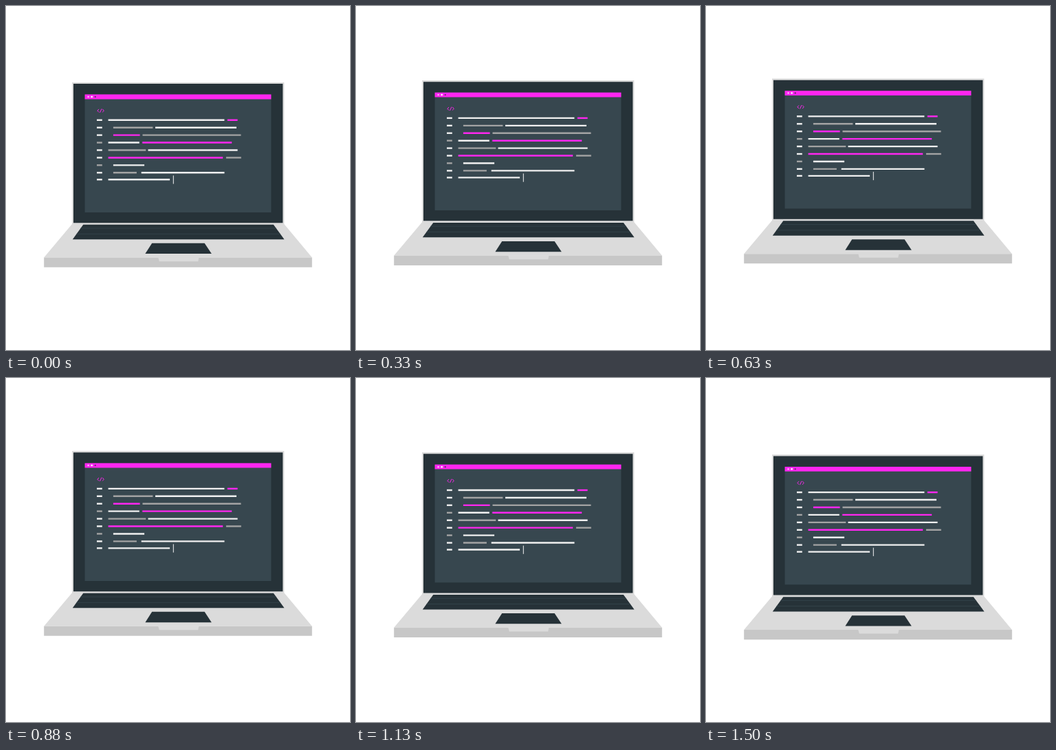
Write an HTML page that moves like this. It is 500x500 px and loops after 1540 ms.

```html
<!DOCTYPE html>
<html lang="en">
<head>
<meta charset="utf-8">
<title>Floating laptop</title>
<style>
  html, body { margin: 0; width: 100%; height: 100%; overflow: hidden; background: #fff; }
  svg { display: block; width: 100vw; height: 100vh; }
</style>
</head>
<body>
<svg viewBox="0 0 500 500">
  <g id="laptop">
    <path fill="#dbdbdb" d="M96 111.3H404.3V317.5L444.8 366H55.2L96 317.5Z"/>
    <path fill="#263238" d="M98 113.5H402.3V315.6H98Z"/>

    <path fill="#37474f" d="M114.6 129H385.4V300.4H114.6Z"/>
    <path fill="#ff26f0" d="M114.6 129H385.4V135.8H114.6Z"/>
    <circle cx="119.6" cy="132.4" r="1.2" fill="#ffc4fa"/>
    <circle cx="124.7" cy="132.4" r="1.3" fill="#fff"/>
    <circle cx="129.7" cy="132.4" r="1.2" fill="#6b2d75"/>
    <path fill="none" stroke="#ff26f0" d="M135 150.3L132.9 152.6L135 154.9M139 149.9L136.5 155.3M140.2 150.3L142.3 152.6L140.2 154.9"/>
    <g id="code" stroke-width="2.4"></g>
    <path stroke="#f5f5f5" d="M243.3 246.8V259"/>

    <path fill="#263238" d="M112.3 318.2H388.8L404.5 339.6H96.8Z"/>
    <path stroke="#37474f" stroke-width=".8" d="M108.5 323.4H392.6M102.7 331.7H398.6"/>
    <path fill="#263238" d="M212.2 345.2H288.6L298.8 360.5H202.4Z"/>
    <path fill="#c7c7c7" d="M55.2 366H444.8V380.2H55.2Z"/>
    <path fill="#dbdbdb" d="M221.2 366H280.4L279.2 371.6H222.8Z"/>
  </g>
</svg>
<script>
  const colors = { w: '#f0f0f0', g: '#a3a3a3', p: '#ff26f0' };

  // Each row: line-number colour, then colour, start, end per segment
  const rows = [
    'w w 148.6 317.4 p 321.8 336.6',
    'w g 155.9 213.4 w 217 335',
    'w p 155.9 194.6 g 198.5 341.5',
    'g w 148.6 193.8 p 198.2 328.2',
    'w g 148.6 203.3 w 206.5 336.6',
    'w p 148.6 315.2 g 319.9 341.8',
    'g w 155.9 201.1',
    'w g 155.9 189.9 w 196.7 317.5',
    'w w 148.6 238.1'
  ];
  const dash = (c, x1, x2, y) =>
    `<path stroke="${colors[c]}" d="M${x1} ${y}H${x2}"/>`;

  document.getElementById('code').innerHTML = rows.map((row, i) => {
    const y = i < 8 ? 166.2 + i * 10.93 : 252.7;
    const [num, ...seg] = row.split(' ');
    let out = dash(num, 132, 139.8, y);
    for (let k = 0; k < seg.length; k += 3) out += dash(seg[k], seg[k + 1], seg[k + 2], y);
    return out;
  }).join('');

  const LOOP = 1540, FPS = 24, RISE = 6.67, LEAD = 48;
  const laptop = document.getElementById('laptop');
  const start = performance.now();

  // Constant-speed rise and fall, shown at 24 steps a second
  function draw(now) {
    const t = Math.max(0, now - start) % LOOP;
    const step = Math.floor((Math.floor(t / 10) * 10 + 4) * FPS / 1000);
    const phase = ((step * 1000 / FPS + LEAD) / LOOP) % 1;
    const lift = RISE * (1 - Math.abs(1 - 2 * phase));
    laptop.setAttribute('transform', `translate(0 ${-lift.toFixed(3)})`);
    requestAnimationFrame(draw);
  }
  draw(start);
</script>
</body>
</html>
```
